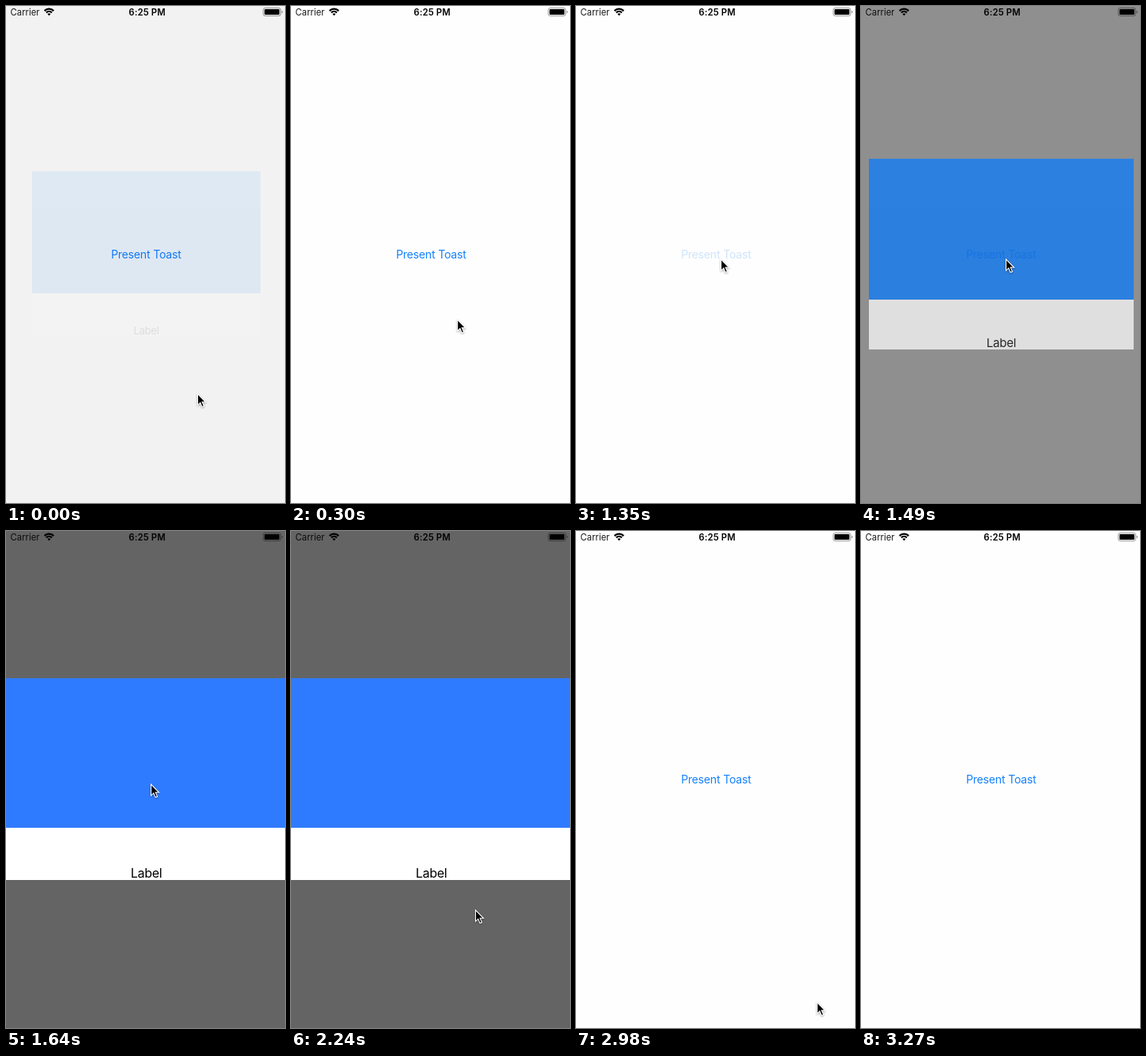
An HTML page for the animation above (3420 ms loop, 353 by 628 pixels).

```html
<!DOCTYPE html>
<html lang="en">
<head>
<meta charset="utf-8">
<title>Toast</title>
<style>
  html, body { margin: 0; width: 100%; height: 100%; overflow: hidden; background: #fefefe; }
  svg { display: block; width: 353px; height: 628px; font-family: Inter, Roboto, sans-serif; }
  .status { font-size: 11.3px; }
  #clock { font-weight: 600; letter-spacing: .2px; }
  #button { font-size: 14.1px; letter-spacing: -.2px; fill: #1480ff; }
  #label { font-size: 16px; letter-spacing: -.3px; }
  #cursor { filter: drop-shadow(0 1px 1px rgba(0, 0, 0, .35)); }
</style>
</head>
<body>
<svg viewBox="0 0 353 628">
  <rect width="353" height="628" fill="#fefefe"/>

  <g class="status">
    <text x="5.6" y="11.7" fill="#1c1c1c">Carrier</text>
    <g fill="none" stroke="#000" stroke-width="2.2">
      <path d="M48.7 6.1A8.2 8.2 0 0 1 60.3 6.1"/>
      <path d="M51 8.4A5 5 0 0 1 58 8.4"/>
    </g>
    <path d="M54.5 12.2L52.5 10.1A2.9 2.9 0 0 1 56.5 10.1Z"/>
    <text id="clock" x="178.6" y="11.7" text-anchor="middle">6:25 PM</text>
    <rect x="325.5" y="2.5" width="22" height="10" rx="2.4" fill="none" stroke="#000" stroke-opacity=".4"/>
    <rect x="327" y="4" width="19" height="7" rx="1.2"/>
    <path d="M348.7 5.8Q350.2 6.2 350.2 7.5T348.7 9.2Z" fill-opacity=".4"/>
  </g>

  <text id="button" x="177.3" y="319" text-anchor="middle">Present Toast</text>

  <rect id="dim" width="353" height="628"/>
  <g id="toast">
    <rect id="top"/>
    <rect id="bottom" fill="#fff"/>
    <text id="label" text-anchor="middle" y="124.2">Label</text>
  </g>

  <g id="cursor">
    <path d="M0 0V14.3L3.3 11.2L5.6 16.6L8 15.6L5.7 10.3H10Z" stroke="#fff" stroke-width="1.1"/>
  </g>
</svg>
<script>
  const LOOP = 3420;
  const TICK = 148.5; // the picture is sampled once per tick
  const CENTER = { x: 177.5, y: 313.5 };
  const HALF = { w: 177.1, h: 127.5 };
  const SPLIT = 61.5; // blue/white border below the center
  const PRESS = 9, DISMISS = 18;

  // cursor stops: tick, x, y
  const path = [
    [0, 242.5, 490], [1, 242.5, 486], [5, 183.5, 320], [11, 183.5, 320], [12, 162, 335],
    [13, 225, 436], [15, 233.5, 479], [DISMISS, 233.5, 479], [19, 263.5, 527], [22, 326, 630]
  ];

  const clamp = v => Math.min(1, Math.max(0, v));
  const easeOut = u => 1 - (1 - u) ** 2.7;
  const ramp = (k, from, length) => {
    const u = clamp((k - from) / length);
    return u * u * (3 - 2 * u);
  };

  function cursorAt(k) {
    const next = path.findIndex(p => p[0] > k);
    if (next < 0) return path.at(-1).slice(1);
    const [k0, x0, y0] = path[next - 1];
    const [k1, x1, y1] = path[next];
    const e = easeOut((k - k0) / (k1 - k0));
    return [x0 + (x1 - x0) * e, y0 + (y1 - y0) * e];
  }

  // the loop opens on the tail of an earlier fade-out
  const toastAt = k =>
    1 - ramp(k, -1, 1.21) + ramp(k, PRESS, 1.53) - ramp(k, DISMISS, 1.31);

  const buttonAt = k => k < PRESS ? 1 : clamp(.2 + .4 * (k - PRESS));

  const set = (id, attrs) => {
    const node = document.getElementById(id);
    for (const key in attrs) node.setAttribute(key, attrs[key]);
  };

  function draw(k) {
    const alpha = toastAt(k);
    const scale = .8 + .2 * alpha;
    const left = Math.round(CENTER.x - HALF.w * scale);
    const width = Math.round(CENTER.x + HALF.w * scale) - left;
    const top = Math.floor(CENTER.y - HALF.h * scale);
    const split = Math.floor(CENTER.y + SPLIT * scale);
    const end = Math.round(CENTER.y + HALF.h * scale);

    set('button', { opacity: buttonAt(k) });
    set('dim', { opacity: alpha * .605 });
    set('toast', { opacity: alpha });
    set('top', {
      x: left, y: top, width, height: split - top,
      fill: alpha < 1 ? '#067aff' : '#2f7bff'
    });
    set('bottom', { x: left, y: split, width, height: end - split });
    set('label', { transform: `translate(${CENTER.x} ${CENTER.y}) scale(${scale})` });
    set('cursor', { transform: `translate(${cursorAt(k)})` });
  }

  let shown = -1;
  function tick() {
    const k = Math.floor(performance.now() % LOOP / TICK);
    if (k !== shown) draw(shown = k);
    requestAnimationFrame(tick);
  }
  tick();
</script>
</body>
</html>
```
